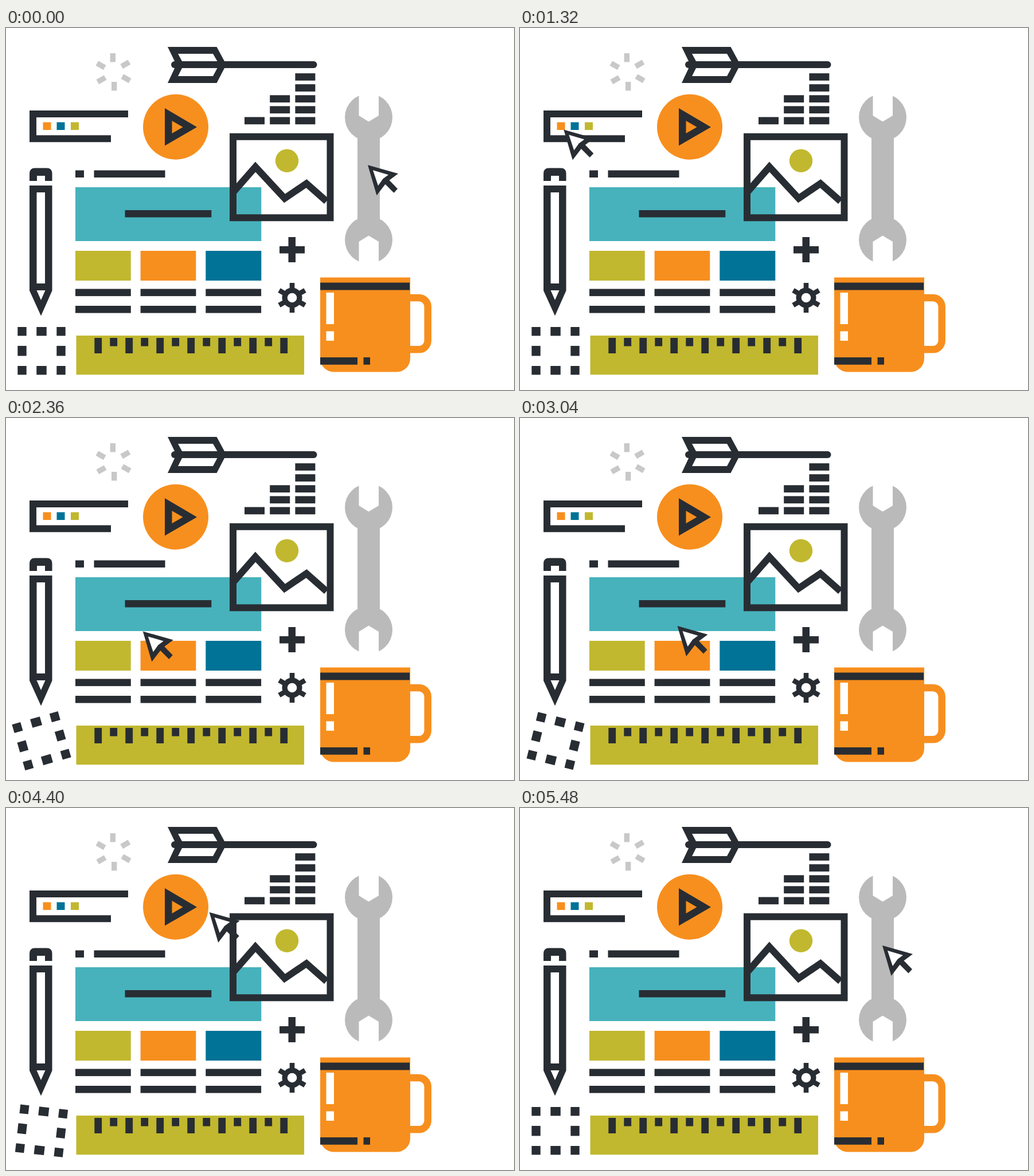
Animation of 886x632 px, one loop 5.76 s. Source, as an HTML page:

```html
<!DOCTYPE html>
<html lang="en">
<head>
<meta charset="utf-8">
<title>Design tools</title>
<style>
  html, body { margin: 0; width: 100%; height: 100%; overflow: hidden; background: #fff; }
  svg { display: block; width: 886px; height: 632px; }
  .dark { fill: #282d33; }
  .orange { fill: #f78f1e; }
  .teal { fill: #47b2bc; }
  .olive { fill: #c1b82f; }
  .blue { fill: #007397; }
  .grey { fill: #bababa; }
  .pale { fill: #c8c8c8; }
  .white { fill: #fff; }
  .line { fill: none; stroke: #282d33; stroke-width: 12; }
</style>
</head>
<body>
<svg viewBox="0 0 886 632">
  <g id="spinner" class="pale"></g>

  <g id="arrow">
    <path class="dark" d="M282 33H367.5L381 58H387V70H381L367.5 96H282L297 64Z"/>
    <path class="white" d="M300 45H361L368.500 58H307ZM307 70H368.500L361 84H300Z"/>
    <path class="line" stroke-linecap="round" d="M294 64H536.500"/>
  </g>

  <g id="toolbar">
    <path class="line" d="M213 150H47V193.300H183"/>
    <path class="orange" d="M64.500 164.500h14v13.500h-14z"/>
    <path class="blue" d="M88.500 164.500h14v13.500h-14z"/>
    <path class="olive" d="M113 164.500h14v13.500h-14z"/>
  </g>

  <g id="play">
    <circle class="orange" cx="296" cy="172.700" r="57"/>
    <path class="dark" fill-rule="evenodd" d="M277 140L333 173L277 205.500ZM289.500 162V184L308.500 173Z"/>
  </g>

  <g id="bars" class="dark"></g>

  <g id="wrench">
    <g class="grey">
      <circle cx="632.500" cy="156" r="41.500"/>
      <circle cx="632.500" cy="370" r="41.500"/>
      <path d="M613 156H652V370H613Z"/>
    </g>
    <path class="white" d="M615.500 112V153L632.500 163.500L650 153V112ZM615.500 414V373L632.500 362.500L650 373V414Z"/>
  </g>

  <g id="pencil" class="dark">
    <path d="M41 267V254Q41 244.500 50.500 244.500H71Q80.500 244.500 80.500 254V267H68V258H54V267Z"/>
    <path fill-rule="evenodd" d="M41 275H80.500V458.500L61 502.500L41 458.500ZM53.500 287V446H68V287ZM53.500 458L61 475L68.500 458Z"/>
  </g>

  <g id="page">
    <path class="dark" d="M121 248.500h15v12.500h-15zM153.500 248.500h124v12.500h-124z"/>
    <path class="teal" d="M121 278H445.300V372H121Z"/>
    <path class="dark" d="M207.500 318H358.300V330.500H207.500Z"/>
    <path class="olive" d="M121 389h96.700v52h-96.700z"/>
    <path class="orange" d="M234.600 389h96.700v52h-96.700z"/>
    <path class="blue" d="M348.300 389h97v52h-97z"/>
    <g id="rows" class="dark"></g>
  </g>

  <g id="image">
    <circle class="olive" cx="490" cy="231.700" r="20.200"/>
    <path class="line" d="M396 287L435 242.500L486 297.500L524 271.500L559 302.500"/>
    <path class="line" d="M396 189.800H565.500V331.300H396Z"/>
  </g>

  <path class="dark" d="M492.500 365H505V381H521V393.500H505V409H492.500V393.500H477V381H492.500Z"/>

  <g id="gear">
    <g id="spokes" class="dark"></g>
    <circle class="dark" cx="499" cy="471" r="17.500"/>
    <circle class="white" cx="499" cy="471" r="8.300"/>
  </g>

  <g id="mug">
    <path fill="none" stroke="#f78f1e" stroke-width="12.500" d="M703 471H720A15.500 15.500 0 0 1 735.700 486.500V546A15.500 15.500 0 0 1 720 561.300H703"/>
    <path class="orange" d="M548 435.500H705V577A23.500 23.500 0 0 1 681.500 600.500H571.500A23.500 23.500 0 0 1 548 577Z"/>
    <path class="dark" d="M548 444.500H704V457.500H548ZM548 575H613V587.700H548ZM623.500 575H635V587.700H623.500Z"/>
    <path class="white" d="M558.500 462H572V517H558.500ZM558.500 529.500H572V546H558.500Z"/>
  </g>

  <g id="ruler">
    <path class="olive" d="M122.500 537H520V605.300H122.500Z"/>
    <g id="ticks" class="dark"></g>
  </g>

  <g id="dots" class="dark"></g>

  <g id="cursor">
    <path class="white" d="M4 4L45 16L31 30L17 45Z"/>
    <path class="dark" fill-rule="evenodd" d="M0 0L53 15L37.500 26.500L52 41.500L45.500 48.500L30.500 33.500L15.500 53ZM9 9L18 36L26.500 24L36 17Z"/>
  </g>
</svg>

<script>
const LOOP = 5760, STEP = 40;
const byId = id => document.getElementById(id);

function addRect(id, x, y, width, height, transform = '') {
  const el = document.createElementNS('http://www.w3.org/2000/svg', 'rect');
  const attrs = { x, y, width, height, transform };
  for (const key in attrs) el.setAttribute(key, attrs[key]);
  byId(id).append(el);
}

// Loading marks: centre x, centre y, angle
for (const [x, y, angle] of [
  [186.3, 51.8, 90], [188.7, 101.7, 90],
  [165.500, 65.300, 30], [208.300, 63.300, -30],
  [166.500, 90.300, -30], [209.500, 88.300, 30]
]) addRect('spinner', -7.700, -4.700, 15.400, 9.400, `translate(${x} ${y}) rotate(${angle})`);

[1, 3, 5].forEach((count, col) => {
  for (let i = 0; i < count; i++) addRect('bars', 416 + col * 44.200, 155.500 - i * 19.100, 35, 12.700);
});

for (const x of [121, 234.600, 348.300])
  for (const y of [455.500, 485]) addRect('rows', x, y, 96.800, 12.600);

for (let i = 0; i < 13; i++) addRect('ticks', 154.300 + i * 27, 541, 12.800, i % 2 ? 14.500 : 27);

for (const angle of [0, 60, 120])
  addRect('spokes', -4.300, -26, 8.600, 52, `translate(499 471) rotate(${angle})`);

// Eight handles around an empty middle
for (const dx of [-1, 0, 1])
  for (const dy of [-1, 0, 1]) {
    if (!dx && !dy) continue;
    const w = dx ? 15.400 : 17.500, h = dy ? 15.400 : 17.500;
    addRect('dots', dx * 34 - w / 2, dy * 34 - h / 2, w, h);
  }

// Time, then values; linear in between
const cursorKeys = [
  [0, 631, 239.300], [1040, 70, 170], [1280, 70, 170], [2560, 270, 410],
  [2845, 270, 410], [3845, 293, 169], [4160, 293, 169], [5480, 632, 240], [LOOP, 632, 240]
];
const turnKeys = [
  [0, 0], [1040, 90], [1440, 90], [2560, 180],
  [2880, 180], [3920, 270], [4320, 270], [5440, 360], [LOOP, 360]
];

function sample(keys, t) {
  const i = keys.findIndex(key => key[0] > t);
  const a = keys[i - 1], b = keys[i];
  const k = (t - a[0]) / (b[0] - a[0]);
  return a.slice(1).map((v, n) => v + (b[n + 1] - v) * k);
}

const cursor = byId('cursor'), dots = byId('dots');
const start = performance.now();

function draw() {
  const now = Math.max(0, performance.now() - start) % LOOP;
  const t = Math.floor(now / STEP) * STEP;
  const [x, y] = sample(cursorKeys, t);
  const [angle] = sample(turnKeys, t);
  cursor.setAttribute('transform', `translate(${x} ${y})`);
  dots.setAttribute('transform', `translate(62 563.700) rotate(${angle})`);
  requestAnimationFrame(draw);
}
draw();
</script>
</body>
</html>
```
